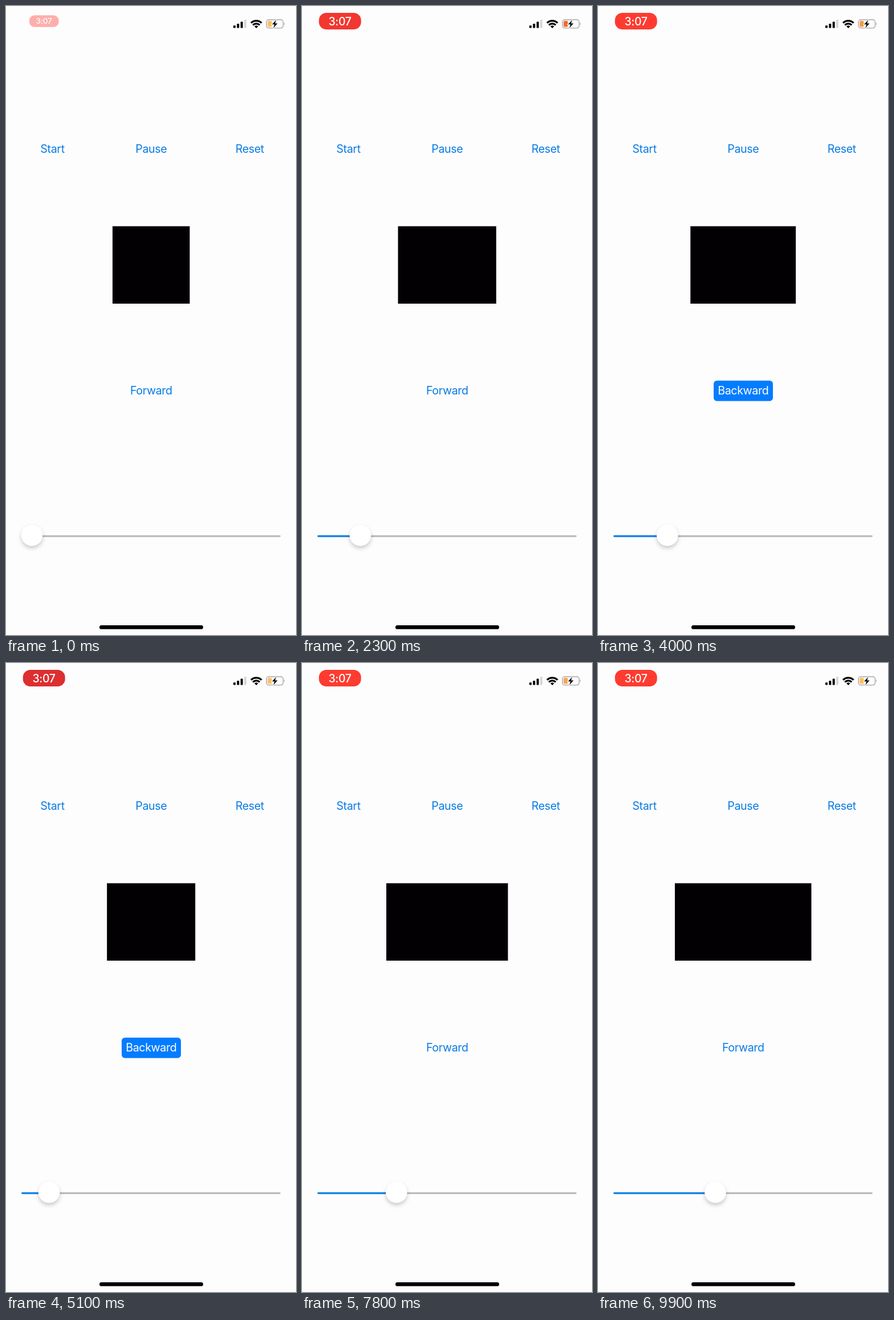
Write an HTML page that moves like this. It is 509 px wide and 1101 px high and loops after 10 s.

```html
<!DOCTYPE html>
<html lang="en">
<head>
<meta charset="utf-8">
<title>Animator controls</title>
<style>
  html, body { margin: 0; width: 100%; height: 100%; overflow: hidden; background: #fefdfe; }
  svg { display: block; width: 509px; height: 1101px; }
  text { font: 19.7px Inter, "Open Sans", sans-serif; letter-spacing: -.4px; text-anchor: middle; fill: #077be4; }
  #clock text { font-size: 19.5px; font-weight: 500; fill: #fff; }
  #backward text { fill: #fff; }
  #thumb { fill: #fff; filter: drop-shadow(0 4px 3.5px rgba(0, 0, 0, .2)); }
</style>
</head>
<body>
<svg viewBox="0 0 509 1101">
  <g id="clock">
    <rect id="pill" x="29.7" y="12" width="74" height="29" rx="13"/>
    <text x="66.5" y="33.6">3:07</text>
  </g>

  <g fill="#050305">
    <rect x="399" y="34" width="4" height="4.6" rx="1"/>
    <rect x="405.3" y="31" width="4" height="7.6" rx="1"/>
    <rect x="411.7" y="27.5" width="4" height="11.1" rx="1"/>
    <rect x="418" y="24" width="4" height="14.6" rx="1" fill="#dad6d8"/>
  </g>

  <g fill="none" stroke="#050305" stroke-width="3.2">
    <path d="M430 29.6a13.3 13.3 0 0 1 18.6 0"/>
    <path d="M433.3 33.4a8.6 8.6 0 0 1 12 0"/>
    <path d="M439.3 39l-3.2-3.3a4.7 4.7 0 0 1 6.4 0z" fill="#050305" stroke="none"/>
  </g>

  <rect x="457.2" y="24" width="29.2" height="14.6" rx="4" fill="none" stroke="#a9a2a9" stroke-width="1.4"/>
  <path d="M488 28.8q2.4 2.5 0 5z" fill="#a9a2a9"/>
  <rect id="charge" x="459.2" y="26" width="7.4" height="10.6" rx="2"/>
  <path d="M474.2 24.4l-7.2 7.9h4.2l-1.9 6.2 7.3-8.1h-4.3z" fill="#050305" stroke="#fefdfe" stroke-width="2" paint-order="stroke"/>

  <text x="81.5" y="257">Start</text>
  <text x="254.8" y="257">Pause</text>
  <text x="427.8" y="257">Reset</text>

  <rect id="box" y="385.5" height="135.5" fill="#020002"/>

  <text id="forward" x="254.8" y="680.3">Forward</text>
  <g id="backward">
    <rect x="203" y="655.8" width="104" height="35.6" rx="5.5" fill="#047cff"/>
    <text x="254.8" y="680.3">Backward</text>
  </g>

  <g stroke-width="2.8" stroke-linecap="round">
    <path d="M28.5 928H480.5" stroke="#b7b5b8"/>
    <path id="progress" stroke="#077ff0"/>
  </g>
  <circle id="thumb" cy="926.5" r="18.8"/>

  <rect x="164" y="1084" width="182" height="6.8" rx="3.4" fill="#020002"/>
</svg>
<script>
  const LOOP = 10, STEP = .1, MIN_X = 45.5, MAX_X = 463.5, SIDE = 135.5, CENTER = 254.7;
  const REVERSED_FROM = 3.375, REVERSED_TO = 5.36;

  // Each track is a list of [seconds, ...values].
  const thumbTrack = [[0, MIN_X], [.96, MIN_X], [REVERSED_FROM, 148], [REVERSED_TO, 64.7], [8.77, 206], [LOOP, 206]];
  const chargeTrack = [[0, 252, 192, 92], [1.5, 242, 88, 34], [3.1, 243, 122, 42],
    [5.1, 252, 192, 100], [6.3, 244, 114, 44], [7.8, 253, 163, 80], [LOOP, 252, 192, 92]];

  const el = id => document.getElementById(id);
  const set = (id, attrs) => {
    for (const name in attrs) el(id).setAttribute(name, attrs[name]);
  };
  const mix = (a, b, k) => a + (b - a) * k;
  const rgb = values => `rgb(${values.map(Math.round)})`;

  function sample(track, t) {
    const i = Math.max(1, track.findIndex(key => key[0] >= t));
    const [from, ...a] = track[i - 1], [to, ...b] = track[i];
    return a.map((v, n) => mix(v, b[n], (t - from) / (to - from)));
  }

  function draw(t) {
    const [x] = sample(thumbTrack, t);
    const width = SIDE * (1 + 2 * (x - MIN_X) / (MAX_X - MIN_X));
    const reversed = t >= REVERSED_FROM && t < REVERSED_TO;
    set('thumb', { cx: x });
    set('progress', { d: x > MIN_X ? `M28.5 928H${x}` : '' });
    set('box', { x: CENTER - width / 2, width });
    set('forward', { visibility: reversed ? 'hidden' : 'visible' });
    set('backward', { visibility: reversed ? 'visible' : 'hidden' });

    // The recording pill pops in, then breathes every two seconds.
    const pop = 1 - (1 - Math.min(1, t / .3)) ** 2;
    const glow = (1 + Math.cos(Math.PI * (t - 1.9))) / 2;
    set('clock', {
      opacity: mix(.4, 1, pop),
      transform: `translate(66.7 26.5) scale(${mix(.7, 1, pop)}) translate(-66.7 -26.5)`
    });
    set('pill', { fill: rgb([mix(217, 255, glow), mix(46, 59, glow), 48]) });
    set('charge', { fill: rgb(sample(chargeTrack, t)) });
  }

  function tick() {
    const seconds = performance.now() / 1000 % LOOP;
    draw(Math.floor(seconds / STEP) * STEP);
    requestAnimationFrame(tick);
  }
  tick();
</script>
</body>
</html>
```
